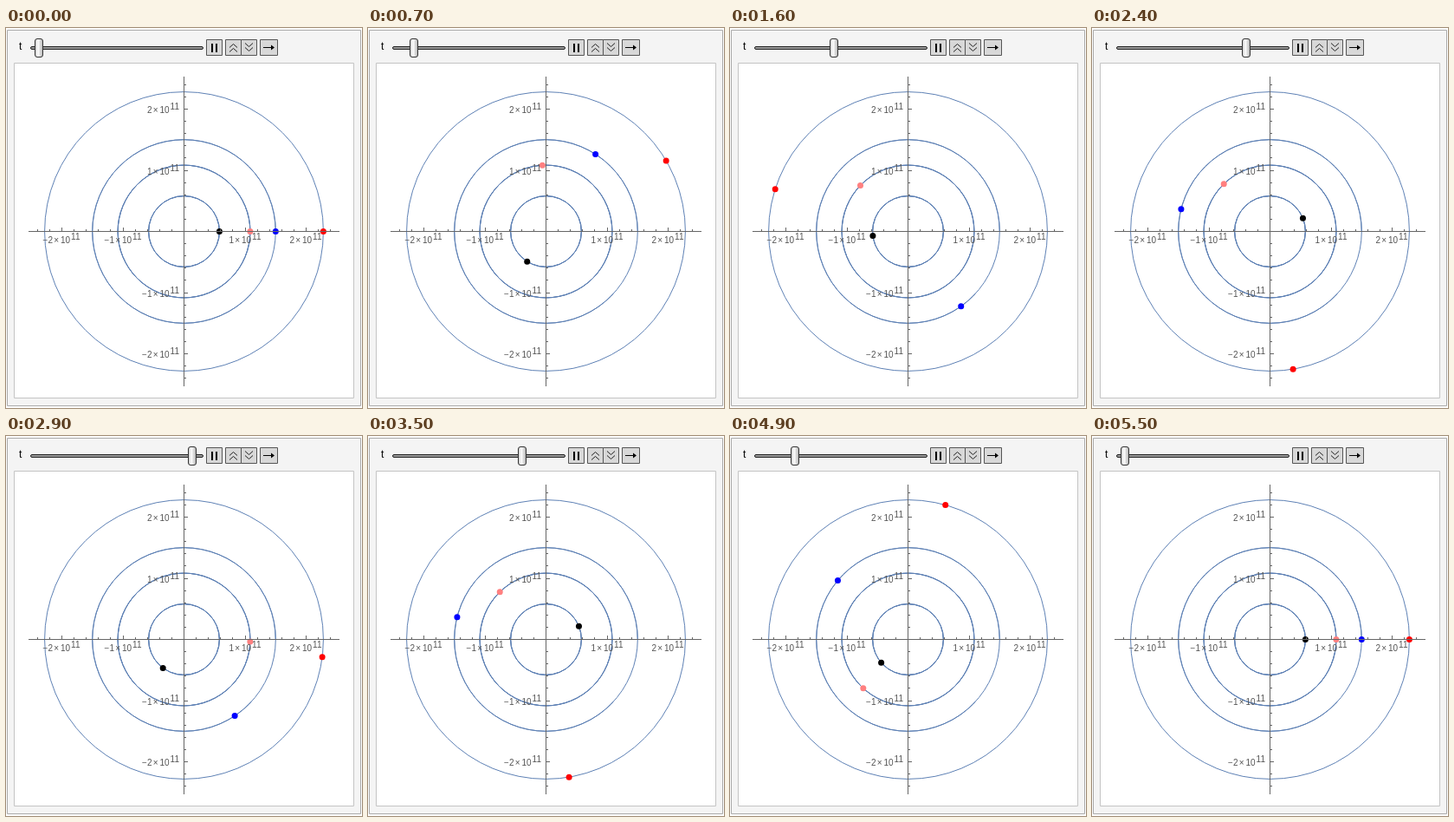
Recreate the animation shown at these times as an HTML page with a canvas. Size 411 px wide and 438 px high, loop 6000 ms.

```html
<!DOCTYPE html>
<html>
<head>
<meta charset="utf-8">
<style>
html, body { margin: 0; height: 100%; overflow: hidden; background: #fff; }
canvas { display: block; }
</style>
</head>
<body>
<canvas id="stage" width="411" height="438"></canvas>
<script>
const ctx = document.getElementById('stage').getContext('2d');
const CX = 205.5, CY = 234.5, UNIT = 70.5; // UNIT: pixels per 1e11
const SPAN = 24.58;                        // slider range, in animation steps
const LAG = 0.92;
const TAU = 2 * Math.PI;

// speed: degrees per step
const planets = [
  { radius: 40.9, speed: 114.35, color: '#000' },
  { radius: 76.4, speed: 44.77, color: '#ff8080' },
  { radius: 105.8, speed: 27.56, color: '#00f' },
  { radius: 160.9, speed: 14.65, color: '#f00' },
];

function line(color, width, ...points) {
  ctx.beginPath();
  points.forEach(([x, y]) => ctx.lineTo(x, y));
  ctx.strokeStyle = color;
  ctx.lineWidth = width;
  ctx.stroke();
}

function box(x, y, w, h, fill, stroke, radius = 0) {
  ctx.beginPath();
  ctx.roundRect(x, y, w, h, radius);
  ctx.fillStyle = fill;
  ctx.fill();
  ctx.strokeStyle = stroke;
  ctx.lineWidth = 1;
  ctx.stroke();
}

function drawSlider(x) {
  ctx.fillStyle = '#000';
  ctx.font = '12px "Liberation Sans", Arial, sans-serif';
  ctx.textAlign = 'left';
  ctx.fillText('t', 15, 25);
  box(28.5, 21.5, 199, 3, '#999', '#222', 1.5);
  const shade = ctx.createLinearGradient(x - 5, 0, x + 5, 0);
  shade.addColorStop(0, '#bbb');
  shade.addColorStop(0.4, '#fff');
  shade.addColorStop(1, '#aaa');
  box(x - 4.5, 12.5, 9, 21, shade, '#333', 2.5);
}

function drawButtons() {
  for (const [x, w] of [[231.5, 18], [253.5, 18], [271.5, 18], [293.5, 20]])
    box(x, 13.5, w, 18, '#d8d8d8', '#555');
  ctx.fillStyle = '#000';
  ctx.fillRect(237, 18, 2, 10);
  ctx.fillRect(242, 18, 2, 10);
  for (const y of [18.5, 23.5]) {
    line('#222', 1, [258, y + 4], [262.5, y], [267, y + 4]);
    line('#222', 1, [276, y - 1], [280.5, y + 3], [285, y - 1]);
  }
  line('#000', 1, [297, 22.5], [308, 22.5]);
  ctx.beginPath();
  ctx.moveTo(310, 22.5);
  ctx.lineTo(306, 19.5);
  ctx.lineTo(306, 25.5);
  ctx.fill();
}

function label(value, right, y) {
  const mantissa = String(value).replace('-', '−');
  ctx.fillText('11', right, y - 4);
  ctx.fillText('10', right - 11.5, y);
  ctx.fillText('×', right - 24.5, y);
  ctx.fillText(mantissa, right - 31.5, y);
}

function drawAxes() {
  const color = '#666';
  line(color, 1, [26, CY], [385, CY]);
  line(color, 1, [CX, 56], [CX, 413]);
  ctx.font = '10px "Liberation Sans", Arial, sans-serif';
  ctx.textAlign = 'right';
  for (let i = -12; i <= 12; i++) {
    if (!i) continue;
    const major = i % 5 === 0, size = major ? 4.5 : 2.5;
    const x = Math.floor(CX + i * UNIT / 5) + 0.5;
    const y = Math.floor(CY - i * UNIT / 5) + 0.5;
    line(color, 1, [x, CY], [x, CY - size]);
    line(color, 1, [CX, y], [CX + size, y]);
    if (major) {
      ctx.fillStyle = '#555';
      label(i / 5, x + (i < 0 ? 21 : 18), 248);
      label(i / 5, 200, y + 4);
    }
  }
}

// The curve overlaps itself, so repeated turns darken the inner orbits.
function drawOrbit({ radius, speed }) {
  ctx.strokeStyle = '#5e81b5';
  ctx.lineWidth = 1;
  for (let turns = Math.min(3, speed * SPAN / 360); turns > 0.01; turns--) {
    ctx.beginPath();
    ctx.arc(CX, CY, radius, 0, -TAU * Math.min(1, turns), true);
    ctx.stroke();
  }
}

function drawPlanet({ radius, speed, color }, time) {
  const angle = speed * time * TAU / 360;
  ctx.beginPath();
  ctx.arc(CX + radius * Math.cos(angle), CY - radius * Math.sin(angle), 3.5, 0, TAU);
  ctx.fillStyle = color;
  ctx.fill();
}

function draw(ms) {
  const tick = Math.floor(ms % 6000 / 100);
  const step = Math.min(tick - 4, 55 - tick); // forward, then back
  const time = Math.max(0, step - LAG);

  ctx.fillStyle = '#fff';
  ctx.fillRect(0, 0, 411, 438);
  box(1.5, 2.5, 408, 433, '#f4f4f4', '#aaa');
  box(9.5, 40.5, 392, 386, '#fff', '#c4c4c4');
  drawSlider(Math.round(38 + 7.36 * time));
  drawButtons();
  planets.forEach(drawOrbit);
  planets.forEach(p => drawPlanet(p, time));
  drawAxes();
}

function loop() {
  draw(performance.now());
  requestAnimationFrame(loop);
}
loop();
</script>
</body>
</html>
```
